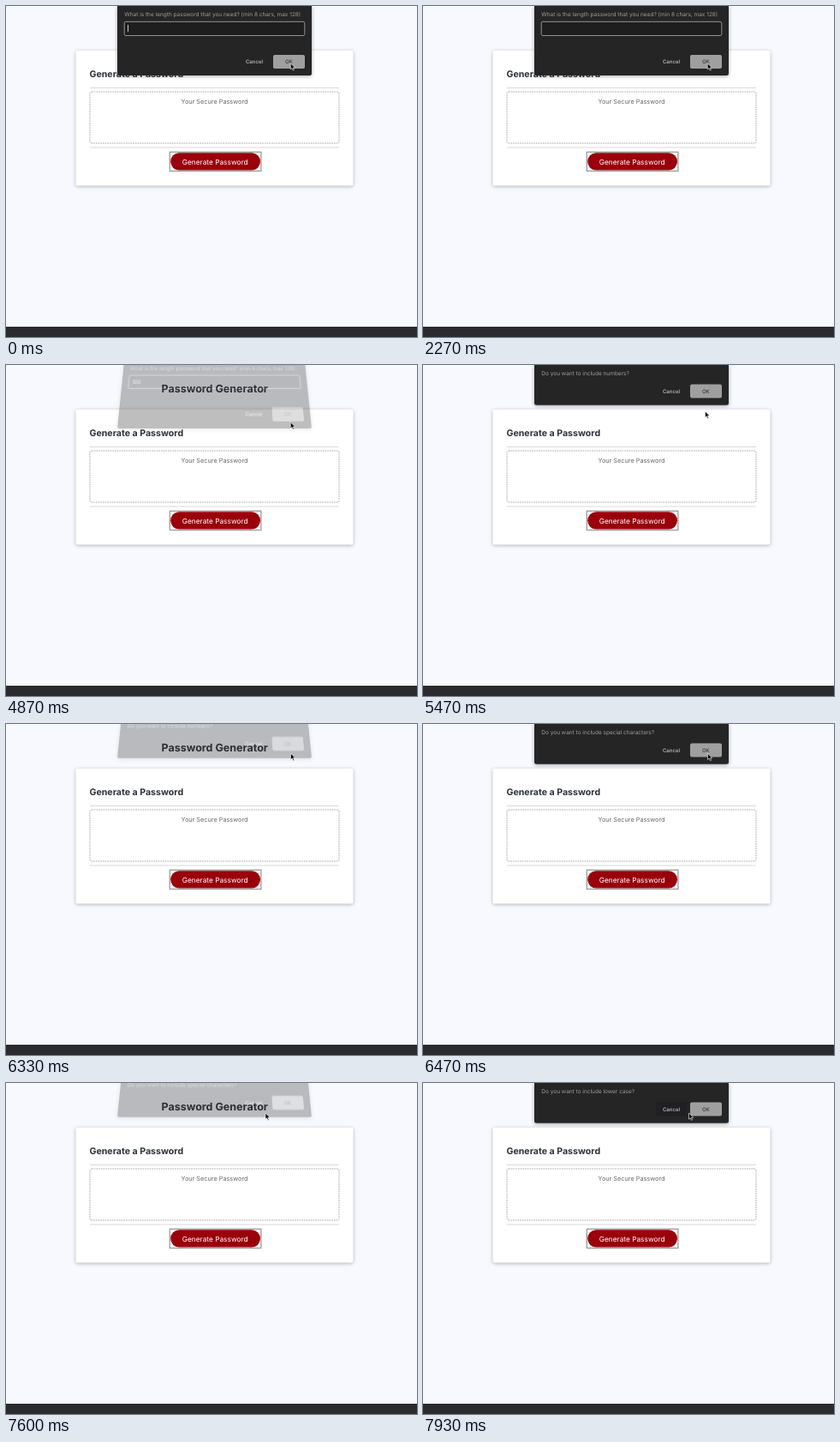
Write an HTML page that moves like this. It is 480 by 386 pixels and loops after 8000 ms.

```html
<!DOCTYPE html>
<html lang="en">
<head>
<meta charset="utf-8">
<title>Password Generator</title>
<style>
  html, body { margin: 0; width: 100%; height: 100%; overflow: hidden; background: #f7f9fe; }
  svg { position: absolute; left: 0; top: 0; width: 480px; height: 386px; }
  text { font-family: Inter, Roboto, sans-serif; text-rendering: geometricPrecision; white-space: pre; }
  .title { font-weight: 700; fill: #2d3139; }
  .mid { text-anchor: middle; }
  .card { fill: #fff; filter: drop-shadow(0 1px 2px rgba(0, 0, 0, .28)); }
  .rule { stroke: #d9d9dc; stroke-width: 1.2; }
  .slot { fill: none; stroke: #a2a2a2; stroke-width: .9; stroke-dasharray: 1.7 1; }
  #dialog { filter: drop-shadow(0 1px 2px rgba(0, 0, 0, .35)); }
  #dialog text { font-size: 6.5px; }
  #message { fill: #9d9d9d; }
  #field rect:first-child { fill: #1e1e1f; stroke: #929292; }
  #typed { fill: #dcdcdc; }
  #buttons text { font-size: 6.1px; font-weight: 500; }
</style>
</head>
<body>
<svg viewBox="0 0 480 386">
  <rect width="480" height="386" fill="#f7f9fe"/>
  <text class="title mid" x="243.7" y="32" font-size="12.5">Password Generator</text>
  <rect class="card" x="81.5" y="52" width="324" height="157.5" rx="2"/>
  <text class="title" x="97.5" y="83" font-size="10.6">Generate a Password</text>
  <path class="rule" d="M98 95.5H389M98 165H389"/>
  <rect class="slot" x="98" y="100" width="291" height="60" rx="2"/>
  <text class="mid" x="243.5" y="114.2" font-size="7.3" fill="#666">Your Secure Password</text>
  <rect x="191.3" y="170.3" width="106.6" height="22.2" fill="#fff" stroke="#999" stroke-width="1.3"/>
  <rect x="192.2" y="171.3" width="104.8" height="20.3" rx="10.1" fill="#99000b"/>
  <text class="mid" x="244.2" y="184.6" font-size="8.3" fill="#fff">Generate Password</text>
  <rect y="374" width="480" height="12" fill="#2b2b2f"/>
</svg>

<svg id="dialog" viewBox="0 0 480 386">
  <rect id="panel" x="130" y="-20" width="227" rx="2.5" fill="#252525"/>
  <text id="message" x="138.3" y="11.7"></text>
  <g id="field">
    <rect x="138.2" y="18.3" width="210.6" height="16.2" rx="1.8"/>
    <text id="typed" x="142.2" y="28.6"></text>
    <rect id="caret" y="22" width=".9" height="8.2" fill="#ddd"/>
  </g>
  <g id="buttons">
    <rect id="cancel" x="272" y="57" width="36" height="16" rx="2" fill="#202024"/>
    <text class="mid" x="290" y="67.2" fill="#c4c4c4">Cancel</text>
    <rect id="ok" x="312" y="57" width="37" height="16" rx="2"/>
    <text class="mid" x="330.4" y="67.2" fill="#3c3c3c">OK</text>
  </g>
</svg>

<svg viewBox="0 0 480 386">
  <path id="cursor" d="M0 0V7.2L1.7 5.7L2.9 8.4L4.1 7.9L2.9 5.3H5.2Z" fill="#000" stroke="#fff" stroke-width=".6"/>
</svg>

<script>
  const LOOP = 8000, RATE = 15 / 1000; // the screen refreshes 15 times a second
  const $ = id => document.getElementById(id);
  const show = (el, on) => el.setAttribute('visibility', on ? 'visible' : 'hidden');

  const prompts = [
    [0, 'What is the length password that you need? (min 8 chars, max 128)'],
    [74, 'Do you want to include numbers?'],
    [96, 'Do you want to include special characters?'],
    [115, 'Do you want to include lower case?']
  ];
  const keys = [[0, ''], [57, '1'], [59, '10'], [62, '100']];
  const blinks = [4, 11, 19, 26, 34, 41, 49, 56, 69];
  const closing = { 73: .3, 95: .3, 113: .75, 114: .3 };
  const opening = { 74: .85, 96: .85, 115: .85 };
  const path = [
    [0, 332.3, 66.7], [79, 332.3, 66.7], [80, 331.5, 62], [82, 329.5, 54],
    [86, 331, 41], [92, 332.5, 34.3], [105, 332.5, 34.3],
    [110, 303, 35], [117, 303, 35], [119, 310.5, 35], [120, 310.5, 35]
  ];

  const latest = (list, tick) => list.filter(item => item[0] <= tick).pop();
  const within = (tick, from, to) => tick >= from && tick < to;

  function pointer(tick) {
    const i = Math.max(1, path.findIndex(p => p[0] >= tick));
    const [t0, x0, y0] = path[i - 1], [t1, x1, y1] = path[i];
    const k = (tick - t0) / (t1 - t0);
    return [x0 + (x1 - x0) * k, y0 + (y1 - y0) * k];
  }

  function drawDialog(tick) {
    const [start, message] = latest(prompts, tick);
    const asksLength = start === 0;
    const bottom = asksLength ? 81 : 46.7;
    $('message').textContent = message;
    $('panel').setAttribute('height', bottom + 20);
    $('buttons').setAttribute('transform', `translate(0 ${asksLength ? 0 : -34.5})`);
    show($('field'), asksLength);
    show($('cancel'), tick >= 108);
    const pressed = within(tick, 71, 74) || within(tick, 92, 96);
    $('ok').setAttribute('fill', pressed ? '#909090' : '#9f9f9f');

    $('typed').textContent = latest(keys, tick)[1];
    const width = $('typed').getComputedTextLength();
    $('caret').setAttribute('x', 142 + width);
    show($('caret'), asksLength && blinks.filter(b => b <= tick).length % 2 === 0);

    // A closing sheet tips backwards while it fades
    const fade = closing[tick] || 1;
    const lean = (1 - fade) / .7;
    const style = $('dialog').style;
    style.opacity = fade * (opening[tick] || 1);
    style.transformOrigin = `243.5px ${bottom}px`;
    style.transform = lean
      ? `translateY(${-7 * lean}px) perspective(160px) rotateX(${8.3 * lean}deg) scaleY(${1 + .06 * lean})`
      : 'none';
  }

  let shown = -1;
  function draw(now) {
    const tick = Math.floor((now % LOOP + 5) * RATE) % 120;
    if (tick !== shown) {
      shown = tick;
      drawDialog(tick);
      $('cursor').setAttribute('transform', `translate(${pointer(tick).join(' ')})`);
    }
  }

  const origin = performance.now();
  function loop() {
    draw(performance.now() - origin);
    requestAnimationFrame(loop);
  }
  loop();
</script>
</body>
</html>
```
